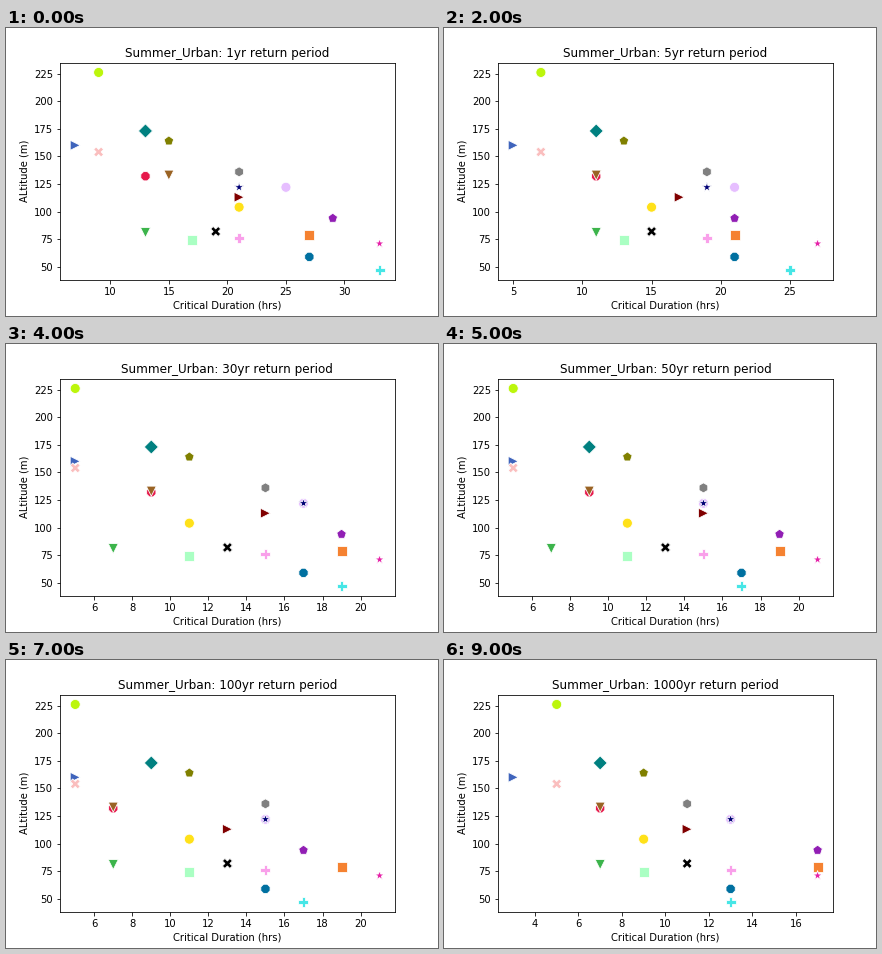
Recreate the animation shown at these times as a matplotlib script. Size 432 px wide and 288 px high, loop 10 s.

```python
import matplotlib.pyplot as plt
import numpy as np
from matplotlib.animation import FuncAnimation
from matplotlib.markers import MarkerStyle

PERIODS = [1, 2, 5, 10, 30, 50, 75, 100, 200, 1000]
KEY_PERIODS = [1, 30, 1000]

# marker, colour, altitude, hours at the key periods; in drawing order
SITES = [
    ("8", "#e6194b", 132, (13.5, 8.3, 6.5)),
    ("v", "#3cb44b", 81, (13.9, 7.9, 7)),
    ("o", "#ffe119", 104, (20.5, 11.5, 9.5)),
    (">", "#3f64bc", 160, (7, 5, 3.5)),
    ("s", "#f58231", 79, (26.5, 19, 17)),
    ("p", "#911eb4", 94, (28, 18.5, 16.9)),
    ("P", "#46e6e6", 47, (33.5, 18.8, 12.5)),
    ("*", "#e620a8", 71, (33.9, 21.9, 17)),
    ("o", "#bcf60c", 226, (8.5, 5.8, 5)),
    ("X", "#fabebe", 154, (8.5, 5.8, 5)),
    ("D", "#008080", 173, (12.8, 9.5, 6.5)),
    ("o", "#e6beff", 122, (25.9, 16.7, 12)),
    ("v", "#9a6324", 133, (14.5, 8.3, 6.5)),
    ("8", "#0070a0", 59, (26.5, 17.5, 13.5)),
    (">", "#800000", 113, (20.5, 15, 11)),
    ("s", "#aaffc3", 74, (17, 11, 9)),
    ("p", "#808000", 164, (14.8, 11.5, 9.5)),
    ("P", "#f9a0ea", 76, (21.9, 15.9, 12.4)),
    ("*", "#000075", 122, (21, 16.5, 13)),
    ("h", "#808080", 136, (21.9, 15.9, 11)),
    ("X", "#000000", 82, (18.5, 12.9, 11)),
]
MARKERS, COLORS, ALTITUDES, KEY_HOURS = zip(*SITES)


def rarity(period):
    return np.log(period) ** 0.6


def durations(period):
    """Hours fall with rarity and are always odd."""
    keys = rarity(KEY_PERIODS)
    hours = np.array([np.interp(rarity(period), keys, k) for k in KEY_HOURS])
    return 2 * np.floor(hours / 2) + 1


def outline(marker):
    style = MarkerStyle(marker)
    return style.get_path().transformed(style.get_transform())


def padded(values, pad=0.05):
    low, high = min(values), max(values)
    gap = (high - low) * pad
    return low - gap, high + gap


plt.rcParams["text.kerning_factor"] = 6
fig = plt.figure(figsize=(6, 4), dpi=72, facecolor="white")
ax = fig.add_subplot()
fig.subplots_adjust(left=0.125, right=0.9, bottom=0.125, top=0.88)
ax.set_xlabel("Critical Duration (hrs)")
ax.set_ylabel("ALtitude (m)")
ax.set_ylim(padded(ALTITUDES))

points = ax.scatter(durations(1), ALTITUDES, s=100, c=COLORS,
                    edgecolors="white", linewidths=0.8)
points.set_paths([outline(m) for m in MARKERS])


def draw(i):
    hours = durations(PERIODS[i])
    points.set_offsets(np.column_stack([hours, ALTITUDES]))
    ax.set_xlim(padded(hours))
    ax.set_title(f"Summer_Urban: {PERIODS[i]}yr return period")


anim = FuncAnimation(fig, draw, frames=len(PERIODS), init_func=lambda: None,
                     interval=1000, repeat=True, repeat_delay=0)
plt.show()
```
